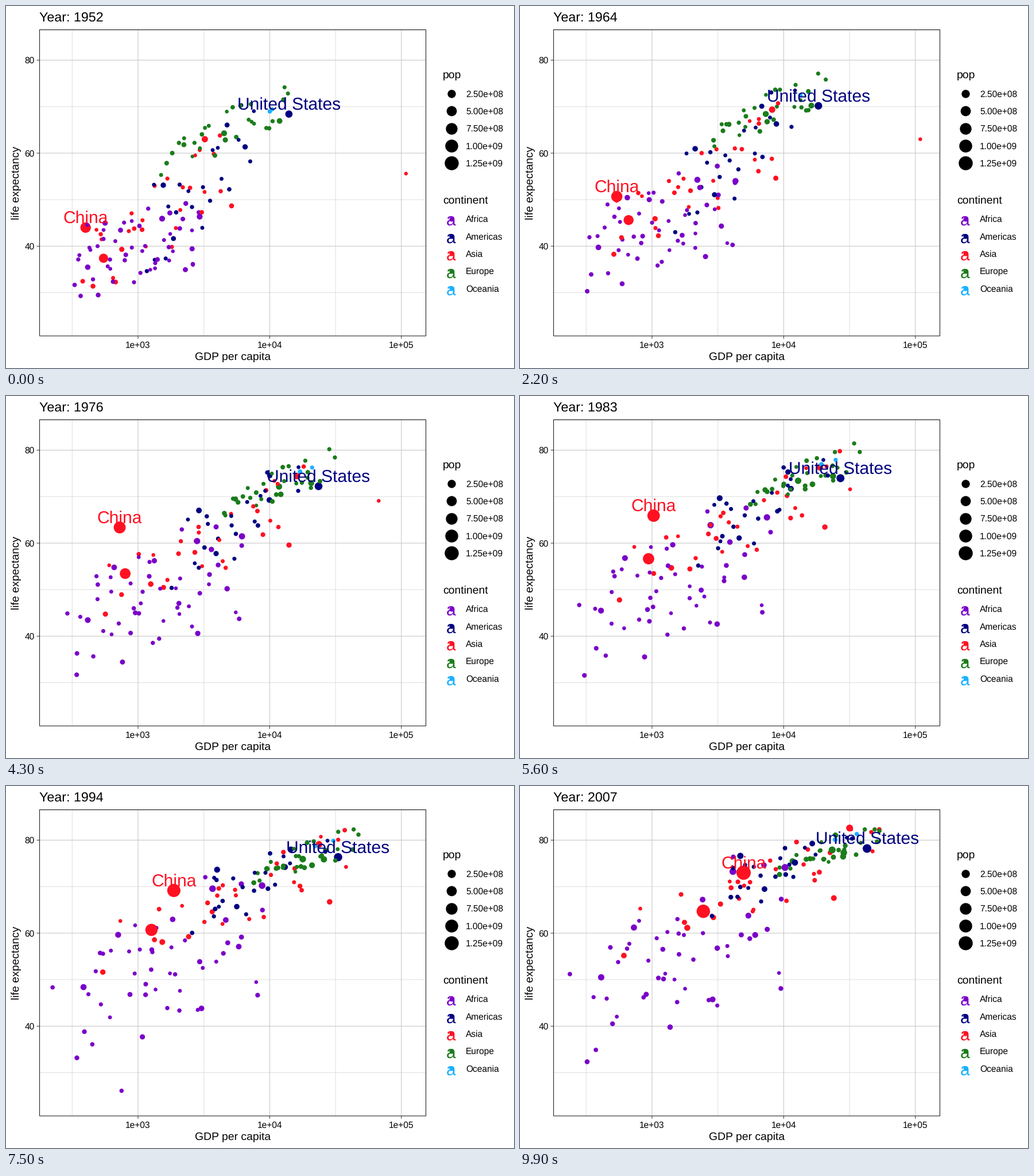
A matplotlib script that plays this animation: 885x632 px, repeating every 10000 ms.

```python
import numpy as np
import matplotlib.pyplot as plt
from matplotlib.animation import FuncAnimation

plt.rcParams["font.family"] = "Liberation Sans"
plt.rcParams["text.hinting"] = "none"

W, H, DPI = 885, 632, 100
FRAMES = 100
PX = 72 / DPI  # points per pixel
BASE = 19.4    # base text size in pixels
SMALL = 0.8 * BASE
LEFT, RIGHT, TOP, BOTTOM = 58.5, 731.5, 41.5, 576

COLORS = {"Africa": "#7a00c8", "Americas": "#000080", "Asia": "#ff1122",
          "Europe": "#1b7c1b", "Oceania": "#1ab0ff"}

KNOTS = np.arange(1952, 2008, 5)
T = (KNOTS - 1952) / 55
EASE = 1 - (1 - T) ** 1.5  # fast early progress that levels off

# continent, population in millions (first, last), key points (year, GDP, life expectancy)
LEADS = {
    "China": ("Asia", 556, 1319, [
        (1952, 400, 44), (1957, 576, 50.5), (1962, 488, 44.5), (1967, 613, 58.4),
        (1977, 741, 64), (1992, 1656, 68.7), (2007, 4959, 73)]),
    "United States": ("Americas", 158, 301, [
        (1952, 13990, 68.4), (1972, 21806, 71.3), (1992, 32004, 76.1), (2007, 42952, 78.2)]),
    "India": ("Asia", 372, 1110, [
        (1952, 547, 37.4), (1977, 813, 54.2), (1992, 1164, 60.2), (2007, 2452, 64.7)]),
    "Japan": ("Asia", 86, 127, [(1952, 3217, 63), (1972, 14779, 73.4), (2007, 31656, 82.6)]),
    "Kuwait": ("Asia", 0.2, 2.5, [
        (1952, 108382, 55.6), (1972, 109348, 67.7), (1982, 31354, 71.3), (2007, 47307, 77.6)]),
    "Rwanda": ("Africa", 2.5, 8.9, [
        (1952, 493, 40), (1987, 848, 44), (1992, 737, 23.6), (2007, 863, 46.2)]),
}

# count, correlation, then (first, last) mean and spread of log10 GDP and of life expectancy
CROWDS = {
    "Africa": (51, 0.42, (3.0, 3.23), (0.28, 0.4), (39.5, 54.8), (5, 9)),
    "Americas": (24, 0.7, (3.48, 3.92), (0.25, 0.27), (53, 73.4), (8.5, 4.2)),
    "Asia": (29, 0.75, (3.15, 3.85), (0.33, 0.5), (46.5, 70.8), (8, 6.2)),
    "Europe": (30, 0.82, (3.67, 4.34), (0.28, 0.22), (65, 77.6), (4.5, 2.7)),
    "Oceania": (2, 0.95, (4.01, 4.47), (0.01, 0.07), (69.2, 80.7), (0.2, 0.5)),
}

rng = np.random.default_rng(7)


def px_x(log_gdp):
    return 230 + 229.4 * (log_gdp - 3)


def px_y(life):
    return 94.5 + 8.12 * (80 - life)


def diameter(pop):
    return 6.2 + 18.7 * np.sqrt(pop / 1319)


def drift(n, jitter):
    """Evenly ranked deviates in random order that slowly change places."""
    a, b = (1.73 * (2 * (rng.permutation(n) + 0.5) / n - 1)[:, None] for _ in range(2))
    turn = 0.5 * T
    return np.cos(turn) * a + np.sin(turn) * b + rng.normal(0, jitter, (n, len(T)))


def lead(first, last, keys):
    years, gdp, life = np.array(keys).T
    x = np.interp(KNOTS, years, np.log10(gdp))
    y = np.interp(KNOTS, years, life)
    return px_x(x), px_y(y), diameter(np.geomspace(first, last, len(T)))


def crowd(n, corr, *ranges):
    gdp, gdp_sd, life, life_sd = (a + (b - a) * EASE for a, b in ranges)
    wealth = drift(n, 0.07)
    health = corr * wealth + np.sqrt(1 - corr ** 2) * drift(n, 0.05)
    pop = np.clip(10 ** rng.normal(0.65, 0.5, (n, 1)), 0.2, 60) * 2.2 ** T
    return px_x(gdp + gdp_sd * wealth), px_y(np.minimum(life + life_sd * health, 82.3)), diameter(pop)


parts = [(cont, lead(*spec)) for cont, *spec in LEADS.values()]
parts += [(cont, crowd(*spec)) for cont, spec in CROWDS.items()]
X, Y, D = (np.vstack([p[i] for _, p in parts]) for i in range(3))
C = np.concatenate([[COLORS[c]] * len(np.atleast_2d(p[0])) for c, p in parts])
ORDER = rng.permutation(len(C))

fig = plt.figure(figsize=(W / DPI, H / DPI), dpi=DPI, facecolor="white")
ax = fig.add_axes([0, 0, 1, 1])
ax.set(xlim=(0, W), ylim=(H, 0))
ax.axis("off")


def text(x, y, s, size=BASE, **kw):
    return ax.text(x, y, s, fontsize=size * PX, va="baseline", **kw)


def line(xs, ys, color, width=1.0, z=1):
    ax.plot(xs, ys, color=color, lw=width * PX, zorder=z, snap=False,
            solid_capstyle="butt", solid_joinstyle="miter")


def dots(x, y, d, color, z):
    return ax.scatter(x, y, s=(d * PX) ** 2, c=color, linewidths=0, zorder=z)


# grid, ticks and frame
for v in (2.5, 3.5, 4.5):
    line([px_x(v)] * 2, [TOP, BOTTOM], "#dedede")
for v in (30, 50, 70):
    line([LEFT, RIGHT], [px_y(v)] * 2, "#dedede")
for v in (3, 4, 5):
    x = px_x(v)
    line([x, x], [TOP, BOTTOM], "#c2c2c2", z=1.5)
    line([x, x], [BOTTOM, BOTTOM + 5], "#333333")
    text(x, 597, f"1e+0{v}", SMALL, ha="center")
for v in (40, 60, 80):
    y = px_y(v)
    line([LEFT, RIGHT], [y, y], "#c2c2c2", z=1.5)
    line([LEFT - 5, LEFT], [y, y], "#333333")
    text(49.5, y + 5.6, str(v), SMALL, ha="right")
line([LEFT, RIGHT, RIGHT, LEFT, LEFT, RIGHT], [TOP, TOP, BOTTOM, BOTTOM, TOP, TOP],
     "#222222", 1.1, 6)

text(395, 618.5, "GDP per capita", ha="center")
text(23.5, 309, "life expectancy", ha="center", rotation=90, rotation_mode="anchor")
title = text(58, 26.3, "", 1.2 * BASE)

# legends
text(761, 126, "pop")
for i in range(5):
    y, pop = 153 + 30.35 * i, 250 * (i + 1)
    dots(776, y, diameter(pop), "black", 3)
    text(801, y + 5.6, f"{pop * 1e6:.2e}", SMALL)
text(761, 344.5, "continent")
for i, (cont, color) in enumerate(COLORS.items()):
    y = 371.5 + 30.35 * i
    text(775.5, y + 11.7, "a", 30, ha="center", color=color)
    dots(776, y, 8, color, 3)
    text(801, y + 5.6, cont, SMALL)

cloud = dots(X[ORDER, 0], Y[ORDER, 0], D[ORDER, 0], C[ORDER], 4)
labels = [text(0, 0, name, 30, ha="center", color=C[i], zorder=5)
          for i, name in enumerate(list(LEADS)[:2])]


def update(i):
    year = 1952 + 55 * i / (FRAMES - 1)
    k = min(int((year - 1952) // 5), len(KNOTS) - 2)
    f = (year - KNOTS[k]) / 5
    x, y, d = (a[:, k] * (1 - f) + a[:, k + 1] * f for a in (X, Y, D))
    cloud.set_offsets(np.column_stack([x, y])[ORDER])
    cloud.set_sizes((d[ORDER] * PX) ** 2)
    for label, lx, ly in zip(labels, x, y):
        label.set_position((lx, ly - 7))
    title.set_text(f"Year: {round(year)}")
    return [cloud, title, *labels]


anim = FuncAnimation(fig, update, frames=FRAMES, interval=100, repeat=True,
                     repeat_delay=0, blit=False)
plt.show()
```
